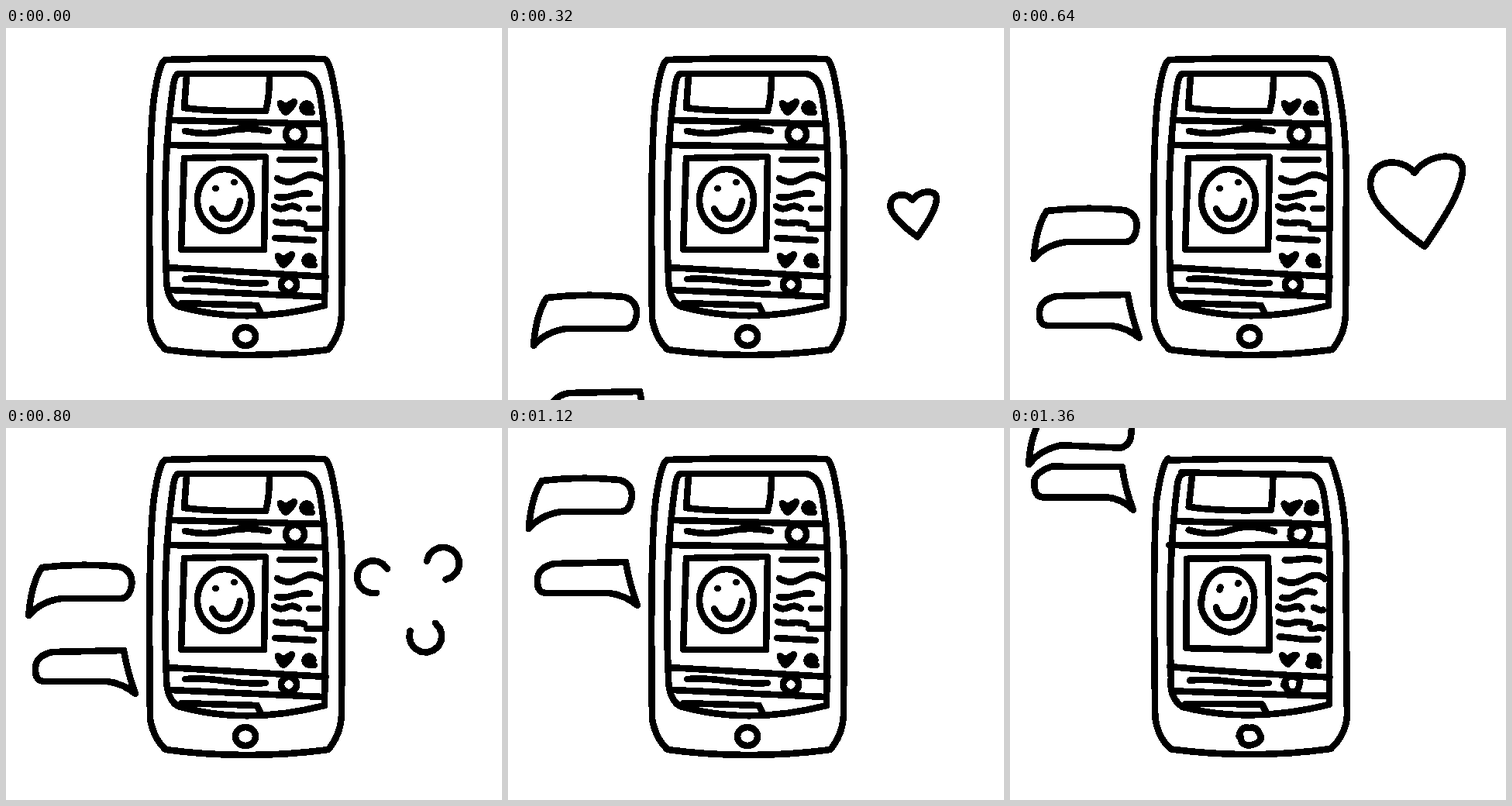
Recreate the animation shown at these times as an HTML page. Size 640 by 480 pixels, loop 1.44 s.

```html
<!DOCTYPE html>
<html lang="en">
<head>
<meta charset="utf-8">
<title>Phone feed</title>
<style>
  html, body { margin: 0; width: 100%; height: 100%; overflow: hidden; background: #fff; }
  svg { display: block; width: 100vw; height: 100vh; }
  path { fill: none; stroke: #000; stroke-width: 8.6; stroke-linecap: round; stroke-linejoin: round; shape-rendering: crispEdges; }
  #icons { fill: #000; }
</style>
</head>
<body>
<svg viewBox="0 0 640 480">
  <path id="lines"/>
  <path id="icons"/>
</svg>
<script>
const STEP = 80, STEPS = 18;

// Paths hold only x y pairs, so every number can be mapped by its position.
const mapPath = (d, fn) => {
  let k = 0;
  return d.replace(/-?\d+(\.\d+)?/g, n => fn(+n, k++));
};
const place = (d, x, y, scale = 1) => mapPath(d, (n, k) => n * scale + (k % 2 ? y : x));

// Every second drawing is a slightly shaky copy.
const random = k => {
  const v = Math.sin(k * 12.9898 + 4) * 43758.5453;
  return v - Math.floor(v);
};
const shaky = d => mapPath(d, (n, k) => n + (random(k) - 0.5) * 4);

const ring = (x, y, rx, ry = rx) => {
  const cx = rx * 0.55, cy = ry * 0.55;
  return `M${x - rx} ${y}C${x - rx} ${y - cy} ${x - cx} ${y - ry} ${x} ${y - ry}` +
    `C${x + cx} ${y - ry} ${x + rx} ${y - cy} ${x + rx} ${y}` +
    `C${x + rx} ${y + cy} ${x + cx} ${y + ry} ${x} ${y + ry}` +
    `C${x - cx} ${y + ry} ${x - rx} ${y + cy} ${x - rx} ${y}Z`;
};
const wave = (x, y, w, bend = 0, slope = 0) =>
  `M${x} ${y}Q${x + w / 4} ${y + bend + slope / 4} ${x + w / 2} ${y + slope / 2}T${x + w} ${y + slope}`;

const phone = [
  // case and screen
  'M206 41Q310 38 411 40Q418 42 424 80Q434 130 434 200L433 370Q432 395 416 415Q310 429 206 415Q190 400 186 375Q183 150 191 90Q198 42 206 41Z',
  'M222 59L385 59Q401 62 405 85Q413 130 413 200L411 358Q310 384 222 359Q207 350 207 322Q201 180 215 80Q217 62 222 59Z',
  // posts
  'M233 62L230 103Q265 108 335 107Q340 90 340 62',
  'M230 168L335 166L333 286L226 286Z',
  'M226 355L324 358L328 367',
  wave(213, 119, 198, 0, 5), wave(207, 151, 204, 0, 3),
  wave(208, 309, 205, 0, 12), wave(212, 338, 197, 0, 9),
  // titles, avatars and home button
  wave(231, 133, 108, 6), wave(231, 324, 104, -3, 5),
  ring(373, 137, 12), ring(365, 331, 10), ring(309, 398, 13, 12),
  // face
  ring(282, 222, 35, 40), 'M266 233Q271 246 282 246Q297 247 302 223',
  'M270 207L271 207M294 199L295 199',
  // comments
  wave(353, 170, 45), wave(350, 194, 57, 9), wave(350, 218, 42, 3, -4),
  wave(346, 230, 32, 5, 3), wave(391, 233, 12), wave(348, 250, 37, 2, 3),
  wave(388, 259, 18), wave(347, 271, 50, 0, 3)
].join('');

const like = 'M-7 -5Q-6 2 0 7Q8 1 11 -7Q5 -4 0 0Z';
const reply = ring(0, 0, 5.5) + 'M0 5L7 6';
const icons = place(like, 361, 102) + place(reply, 388, 103) +
  place(like, 358, 299) + place(reply, 391, 300);

const upperBubble = 'M33 66Q36 25 50 4Q100 -2 150 3Q167 8 166 25Q164 43 152 44L75 44Q48 48 33 66Z';
const lowerBubble = 'M167 57Q157 30 152 1L60 3Q38 8 38 24Q37 41 50 41L130 41Q150 43 167 57Z';
const heart = 'M13 95Q-57 45 -57 15C-57 -20 -15 -20 0 0C15 -25 62 -30 62 -4C62 25 30 70 13 95Z';

// Key positions as [step, x, y].
const upperTrack = [[0, 0, 490], [4, 0, 344], [17, -8, -20]];
const lowerTrack = [[0, 20, 560], [4, 18, 468], [6, 14, 424], [8, 0, 343], [14, 0, 172], [17, -7, 48]];

function position(track, step) {
  const next = Math.max(1, track.findIndex(key => key[0] >= step));
  const [s0, x0, y0] = track[next - 1], [s1, x1, y1] = track[next];
  const mix = (step - s0) / (s1 - s0);
  return [x0 + (x1 - x0) * mix, y0 + (y1 - y0) * mix];
}

function growingHeart(step) {
  const scale = step / 8;
  return place(heart, 522, 187 + 70 * (1 - scale), scale);
}

// Three arcs, open towards the centre, fly apart.
function burst(age) {
  const distance = 56 + 22 * age, radius = 21 - 3 * Math.max(age, 0);
  return [204, -46, 73].map(degrees => {
    const out = degrees * Math.PI / 180;
    const x = 525 + distance * Math.cos(out), y = 215 + distance * Math.sin(out);
    const points = [];
    for (let a = -2.2; a < 2.3; a += 0.4) {
      points.push(`${(x + radius * Math.cos(out + a)).toFixed(1)} ${(y + radius * Math.sin(out + a)).toFixed(1)}`);
    }
    return 'M' + points.join('L');
  }).join('');
}

function draw(time) {
  const step = Math.floor(time / STEP) % STEPS;
  let lines = phone +
    place(upperBubble, ...position(upperTrack, step)) +
    place(lowerBubble, ...position(lowerTrack, step));
  if (step > 0 && step < 9) lines += growingHeart(step);
  if (step > 8 && step < 13) lines += burst(step - 10);
  const finish = step % 2 ? shaky : d => d;
  document.getElementById('lines').setAttribute('d', finish(lines));
  document.getElementById('icons').setAttribute('d', finish(icons));
}

const start = performance.now();
function tick() {
  draw(performance.now() - start);
  requestAnimationFrame(tick);
}
tick();
</script>
</body>
</html>
```
